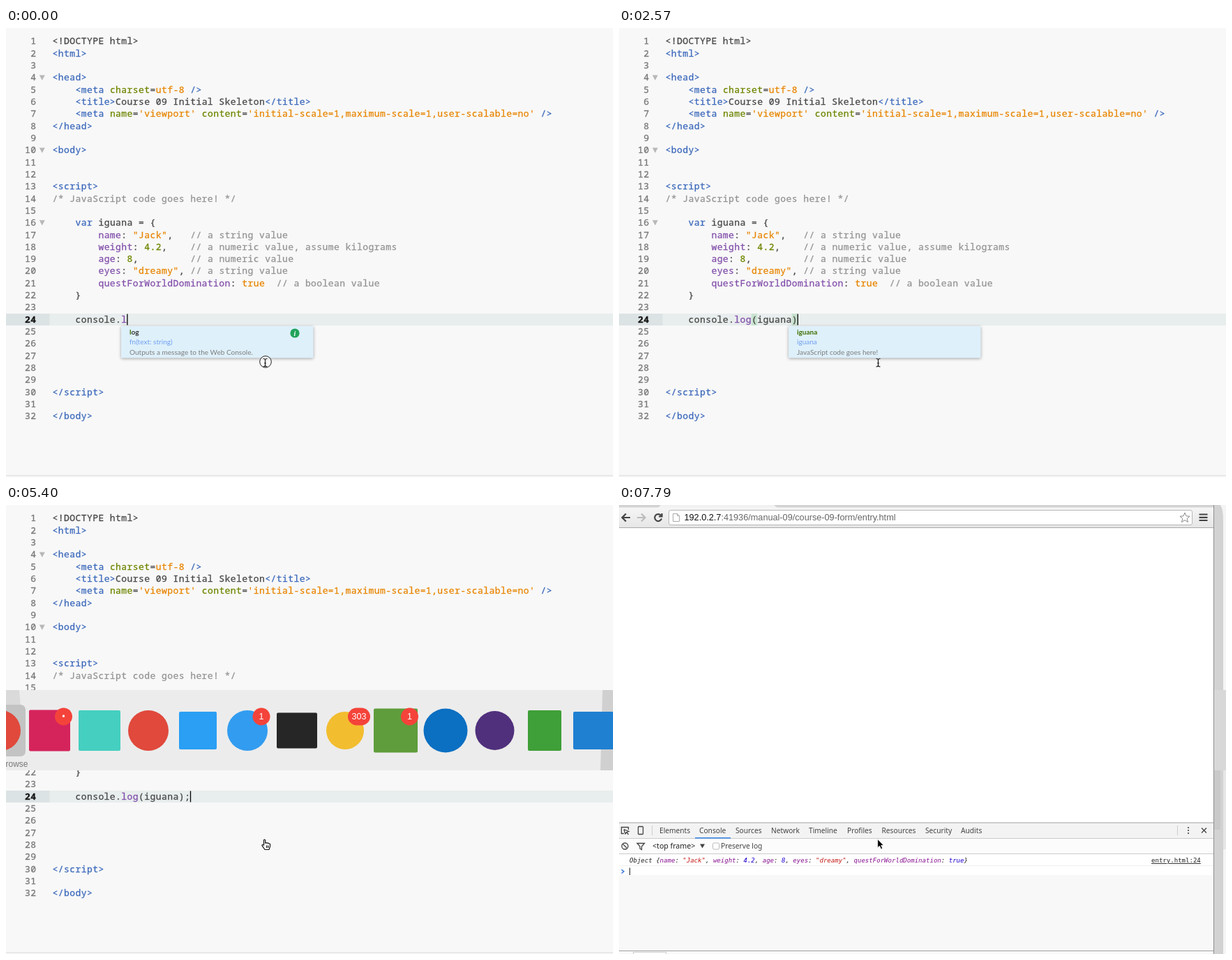
An HTML page that plays this animation: 870 px wide and 643 px high, repeating every 8 s.

```html
<!DOCTYPE html>
<html lang="en">
<head>
<meta charset="utf-8">
<title>Logging an object</title>
<style>
html, body { margin: 0; width: 100%; height: 100%; overflow: hidden; background: #f8f8f8; }
svg { display: block; }
text { white-space: pre; color: #333; }
text, tspan { fill: currentColor; }
.code { font: 13px "Noto Sans Mono", monospace; letter-spacing: .435px; color: #484848; }
.code, .code tspan { stroke: currentColor; stroke-width: .3px; }
.num { color: #787878; text-anchor: end; }
.now { color: #111; font-weight: 700; stroke: none; }
.hint { font: 10.05px Lato, sans-serif; font-variant-ligatures: none; }
.tool { font: 10.2px "Noto Sans", sans-serif; color: #444; }
.frame { font-size: 10.6px; color: #222; }
.log { font: italic 9.05px "DejaVu Sans Mono", monospace; color: #222; }
.link { font-style: normal; text-decoration: underline; }
.url { font: 12.7px "Liberation Sans", sans-serif; color: #666; }
.badge { font: 12.5px "Liberation Sans", sans-serif; color: #fff; text-anchor: middle; }
.mark { font: italic bold 10px "Liberation Serif", serif; color: #fff; text-anchor: middle; }
.app { font: 12px "Liberation Sans", sans-serif; color: #777; }
.b { color: #3c69bb; } .g { color: #6d8600; } .o { color: #e88501; }
.p { color: #8250ab; } .c { color: #949494; } .k { color: #111; }
.m { color: #3f6f00; font-weight: 700; } .w { font-weight: 700; }
.v { color: #881391; } .r { color: #c41a16; } .n { color: #1c00cf; }
.line { fill: none; stroke: #444; stroke-width: 1.3; }
.thick { stroke-width: 2.2; }
.shadow { filter: drop-shadow(0 1px 2px rgba(0, 0, 0, .35)); }
</style>
</head>
<body>
<svg width="870" height="643" viewBox="0 0 870 643">
  <defs>
    <linearGradient id="bar" x2="0" y2="1"><stop stop-color="#f5f5f5"/><stop offset="1" stop-color="#e6e6e6"/></linearGradient>
  </defs>

  <g id="editor">
    <rect width="870" height="643" fill="#f8f8f8"/>
    <rect y="640.5" width="870" height="1.2" fill="#ddd"/>
    <rect y="409" width="870" height="17" fill="#e8eded"/>
    <rect y="409" width="62.5" height="17" fill="#dce3e4"/>
    <g id="match" fill="#c8e3d0">
      <rect x="189.8" y="409" width="8.2" height="17"/>
      <rect id="close" y="409" width="8.2" height="17"/>
    </g>
    <g id="lines"></g>
    <rect id="caret" y="409.5" width="1.3" height="16"/>
    <g id="tip">
      <rect class="shadow" x="190" y="387.5" width="56" height="17" rx="2" fill="#fcfcfc"/>
    </g>
    <g id="popup">
      <g id="list"><rect class="shadow" y="427" width="275.5" height="138" rx="1" fill="#fff"/></g>
      <rect class="shadow" y="427" width="275.5" height="45.5" rx="1" fill="#def0fa"/>
      <g id="info">
        <circle cx="249" cy="437" r="6.6" fill="#21a35a"/>
        <text x="249" y="440.6" class="mark">i</text>
      </g>
    </g>
  </g>

  <g id="browser">
    <rect width="853" height="643" fill="#f8f8f8"/>
    <rect id="page" y="33" width="852" height="422" fill="#fff"/>
    <rect id="veil" y="265" width="852" height="190" fill="#fdfdfd"/>
    <rect width="853" height="4" fill="#d3d3d3"/>
    <path d="M56 4 60 0H222L227 4Z" fill="#f1f1f1"/>
    <rect y="3.5" width="852" height="29" fill="url(#bar)"/>
    <rect y="32" width="852" height="1" fill="#aaa"/>
    <rect x="71.5" y="7.5" width="750" height="21" rx="2.5" fill="#fff" stroke="#b8b8b8"/>
    <path d="M16 18H5M10 12.5 4.5 18 10 23.5" class="line thick"/>
    <path d="M26 18H37M32 12.5 37.5 18 32 23.5" class="line thick" style="stroke:#bcbcbc"/>
    <path id="reload" d="M60.5 15.5A5 5 0 1 0 61 19.5M61.5 12V16.5H57" class="line thick"/>
    <path id="stop" d="M51.5 13.5 60.5 22.5M60.5 13.5 51.5 22.5" class="line thick"/>
    <path d="M77.5 12.5H83.5L86.5 15.5V23.5H77.5ZM83.5 12.5V15.5H86.5" fill="#fff" stroke="#aaa"/>
    <path d="M811 11 813 15.8 818 16.2 814.2 19.5 815.5 24.5 811 21.7 806.5 24.5 807.8 19.5 804 16.2 809 15.8Z" fill="#fff" stroke="#888"/>
    <path d="M831.5 13.5H843.5M831.5 17.8H843.5M831.5 22H843.5" class="line thick"/>

    <rect y="455" width="852" height="22" fill="#f3f3f3"/>
    <rect y="478" width="852" height="21" fill="#fcfcfc"/>
    <path d="M0 477.5H852M0 499.5H852M47.5 459V473M800.5 459V473" stroke="#ccc"/>
    <path d="M0 455H852M0 638.5H852" stroke="#a2a2a2"/>
    <rect x="109" y="476" width="51" height="1.6" fill="#3f86e6"/>
    <path d="M7 470.5H3.5V461.5H13.5V465M7 464.5 14 467.5 11 468.5 13.5 472M7 464.5 9 471 11 468.5" class="line"/>
    <rect x="27.5" y="460.5" width="7" height="11" rx="1" class="line"/>
    <path d="M816 462h0M816 466h0M816 470h0" class="line thick" stroke-linecap="round"/>
    <path d="M835 462.5 842 469.5M842 462.5 835 469.5" class="line"/>
    <circle cx="8.5" cy="488.5" r="4.5" class="line"/>
    <path d="M5.5 485.5 11.5 491.5M26 484.5H36.5L32.5 489V493.5L30 492V489Z" class="line"/>
    <path d="M116 485.5H123L119.5 491.5Z" fill="#444"/>
    <rect x="134.5" y="484" width="9" height="9" rx="1.5" fill="#fff" stroke="#bbb"/>
    <g id="output">
      <rect y="500" width="852" height="30" fill="#fff"/>
      <path d="M0 516.5H852" stroke="#f0f0f0"/>
    </g>
    <g id="prompt">
      <path d="M3.5 506.5 7 509.3 3.5 512" fill="none" stroke="#3879d9" stroke-width="1.5"/>
      <rect id="cursor" x="15" y="504" width="1" height="10.5" fill="#222"/>
    </g>
    <rect x="20.5" y="640.5" width="47" height="6" fill="#fff" stroke="#ccc"/>

    <rect x="853" width="17" height="643" fill="#f4f4f4"/>
    <rect x="853" y="380" width="17" height="113" fill="#e6e6e6"/>
    <path d="M853 0H862Q866 6 866 22V643H853Z" fill="#d2d2d2"/>
    <rect x="853" y="265" width="17" height="115" fill="#d8d8d8"/>
    <rect x="853" y="380" width="9" height="85" fill="#c9c9c9"/>
    <rect x="852" width="1" height="643" fill="#8e8e8e"/>
  </g>

  <g id="switcher">
    <g id="panel">
      <rect y="265" width="870" height="115" fill="#ececec"/>
      <path d="M0 265H19L21 290H0Z" fill="#dadada"/>
      <path d="M855 265H870V380H852Z" fill="#d0d0d0"/>
    </g>
    <g id="pick">
      <rect x="-46" y="286" width="74" height="74" rx="7" fill="#c3c3c3"/>
      <text x="-.5" y="375" class="app">rowse</text>
    </g>
    <g id="icons"></g>
  </g>

  <g id="beam" fill="none" stroke="#222">
    <circle id="ring" cx="372" cy="478" r="8.3" fill="#fff" fill-opacity=".6"/>
    <path d="M368.5 473.5Q371.5 473.5 371.5 475.5Q371.5 473.5 374.5 473.5M371.5 475V483.5M368.5 485Q371.5 485 371.5 483Q371.5 485 374.5 485M370 480H373" stroke-width="1.2"/>
  </g>
  <path id="hand" d="M369.5 487V480.3Q369.5 479 370.5 479T371.7 480.3V484Q373 483 374 484.3Q375.5 483.5 376.3 484.8Q378.5 484.5 378.5 486.5V489L377 493.5H371L367 487.7Q366.7 485.7 369.5 487ZM373.5 487.5V491M375.7 487.5V491" fill="#fff" stroke="#111" stroke-width="1.2"/>
  <path id="arrow" d="M370.7 478.5V490.8L373.5 488.3 375.5 492.8 377.7 491.8 375.7 487.5H379.3Z" stroke="#fff" stroke-width=".8"/>
</svg>
<script>
const LOOP = 8000, COL = 8.235, LEFT = 66.5;
const $ = id => document.getElementById(id);

function add(parent, tag, attrs) {
  const el = document.createElementNS("http://www.w3.org/2000/svg", tag);
  for (const k in attrs) el.setAttribute(k, attrs[k]);
  return parent.appendChild(el);
}

// "~x" switches to colour class x, "~_" back to the default
function write(el, str) {
  el.textContent = "";
  str.split(/(?=~\w)/).forEach(part => {
    const marked = part[0] === "~";
    add(el, "tspan", marked ? { class: part[1] } : {}).textContent = marked ? part.slice(2) : part;
  });
}

function label(parent, x, y, str, cls) {
  const el = add(parent, "text", { x, y, class: cls });
  write(el, str);
  return el;
}

const source = [
  "<!DOCTYPE html>", "~b<html>", "", "~b<head>",
  "    ~b<meta ~gcharset~_=~outf-8~b />",
  "    ~b<title>~_Course 09 Initial Skeleton~b</title>",
  "    ~b<meta ~gname~_=~o'viewport' ~gcontent~_=~o'initial-scale=1,maximum-scale=1,user-scalable=no'~b />",
  "~b</head>", "", "~b<body>", "", "", "~b<script>",
  "~c/* JavaScript code goes here! */", "",
  "    ~bvar~_ iguana = {",
  "        ~pname~_: ~o\"Jack\"~_,   ~c// a string value",
  "        ~pweight~_: ~g4.2~_,    ~c// a numeric value, assume kilograms",
  "        ~page~_: ~g8~_,         ~c// a numeric value",
  "        ~peyes~_: ~o\"dreamy\"~_, ~c// a string value",
  "        ~pquestForWorldDomination~_: ~otrue  ~c// a boolean value",
  "    }", "", "", "", "", "", "", "", "~b<\/script>", "", "~b</body>"
];
const rows = source.map((str, i) => {
  const y = 23.4 + 17.32 * i;
  label($("lines"), 43.5, y, String(i + 1), "code num" + (i === 23 ? " now" : ""));
  return label($("lines"), LEFT, y, str, "code");
});
[4, 10, 16].forEach(n => {
  const y = 15.5 + 17.32 * (n - 1);
  add($("lines"), "path", { d: `M47.8 ${y}h8l-4 7.5z`, fill: "#b8b8b8" });
});

label($("tip"), 195, 399.3, "String text", "hint");
const hint = [438.5, 453.2, 468].map(y => label($("popup"), 12, y, "", "hint"));
hint[1].style.color = "#6f9ff2";
hint[2].style.color = "#7d7d7d";
["isFinite", "isNaN", "Infinity", "isPrototypeOf", "Int8Array"]
  .forEach((s, i) => label($("list"), 12, 485 + 18 * i, s, "hint"));

const web = $("browser"), output = $("output");
label(web, 93.5, 22.4, "~k192.0.2.7~_:41936/manual-09/course-09-form/entry.html", "url");
const tabs = { Elements: 58, Console: 115, Sources: 167, Network: 218, Timeline: 272,
  Profiles: 327, Resources: 376.5, Security: 439, Audits: 490 };
for (const name in tabs) label(web, tabs[name], 470, name, "tool");
label(web, 48, 492.3, "<top frame>", "tool frame");
label(web, 146, 492.3, "Preserve log", "tool");
label(output, 15, 512, "Object {~vname~_: ~r\"Jack\"~_, ~vweight~_: ~n4.2~_, ~vage~_: ~n8~_, " +
  "~veyes~_: ~r\"dreamy\"~_, ~vquestForWorldDomination~_: ~ntrue~_}", "log");
label(output, 763, 512, "entry.html:24", "log link");

// x centre, width, height (0 = round), colour, badge
[
  [-8, 58, 0, "#e0493c"], [62.5, 59, 59, "#d5245c", "•"], [134, 60, 58, "#45cfc0"],
  [204, 58, 0, "#e0493c"], [275, 54, 54, "#2a9ff4"], [346, 58, 0, "#329cf0", "1"],
  [417, 58, 51, "#262626"], [486, 54, 0, "#f3bd30", "303"], [558.5, 63, 63, "#5f9d3c", "1"],
  [630, 63, 0, "#0b6fc2"], [700.5, 56, 0, "#50307c"], [772, 48, 58, "#3f9f38"], [842, 58, 54, "#1f80d2"]
].forEach(([x, w, h, fill, badge]) => {
  const g = $("icons"), tall = h || w;
  add(g, "rect", { x: x - w / 2, y: 323 - tall / 2, width: w, height: tall, rx: h ? 2 : w / 2, fill });
  if (!badge) return;
  const bx = x + 20, bw = badge.length > 1 ? 32 : 25;
  add(g, "rect", { x: bx - bw / 2, y: 290.5, width: bw, height: 25, rx: 12.5, fill: "#f4433a" });
  label(g, bx, 307.4, badge, "badge");
});

const keys = [0, 150, 300, 480, 1230, 1380, 1530, 1680, 1830, 1970, 2570, 3320];
const blinks = [[1080, 1230], [3170, 3320], [3770, 4360], [4810, 5400], [6290, 6740], [7190, 7790]];
const show = (id, on) => { $(id).style.display = on ? "" : "none"; };

function typing(t) {
  const n = keys.filter(k => k <= t).length, col = 8 + n;
  const paired = n > 3;
  const name = "iguana".slice(0, Math.max(0, n - 4));
  write(rows[23], "    console.~p" + "log".slice(0, n) +
    (paired ? "~_(" + name + ")" + (n > 11 ? ";" : "") : ""));
  $("caret").setAttribute("x", LEFT + COL * (4 + col) - .3);
  $("close").setAttribute("x", LEFT + COL * (16 + name.length));
  show("match", paired && n < 12);
  show("tip", n === 4);

  show("popup", n !== 4 && t < 2720);
  show("info", !paired);
  show("list", n === 5 || n === 6);
  const x = t >= 2120 ? 243 : 165 + COL * (n - 1);
  $("popup").setAttribute("transform", `translate(${x})`);
  const typed = paired ? name : "log".slice(0, n);
  const word = paired ? "iguana" : "log";
  write(hint[0], "~m" + typed + "~w" + word.slice(typed.length));
  write(hint[1], paired ? word : "fn(text: string)");
  write(hint[2], paired ? "JavaScript code goes here!" : "Outputs a message to the Web Console.");
}

function render(t) {
  const lit = !blinks.some(([a, b]) => t >= a && t < b);
  const inWeb = t >= 5700, logged = t >= 7040;
  show("editor", !inWeb);
  show("browser", inWeb);
  if (!inWeb) typing(t);
  show("caret", lit);

  show("beam", t < 4810);
  show("ring", t < 150);
  show("hand", t >= 4810 && !inWeb);
  show("arrow", inWeb);

  show("switcher", t >= 4950 && t < 6000);
  show("pick", t >= 5400 && t < 5850);
  show("panel", t < 5850);
  $("switcher").style.opacity = t < 5700 ? 1 : t < 5850 ? .5 : .14;

  show("page", t >= 6000);
  show("veil", t < 6000);
  show("output", logged);
  show("cursor", lit);
  $("prompt").setAttribute("transform", `translate(0 ${logged ? 15.5 : 0})`);
  const loading = logged && t < 7190;
  show("stop", loading);
  show("reload", !loading);
}

const start = performance.now();
function tick() {
  render((performance.now() - start) % LOOP);
  requestAnimationFrame(tick);
}
tick();
</script>
</body>
</html>
```
